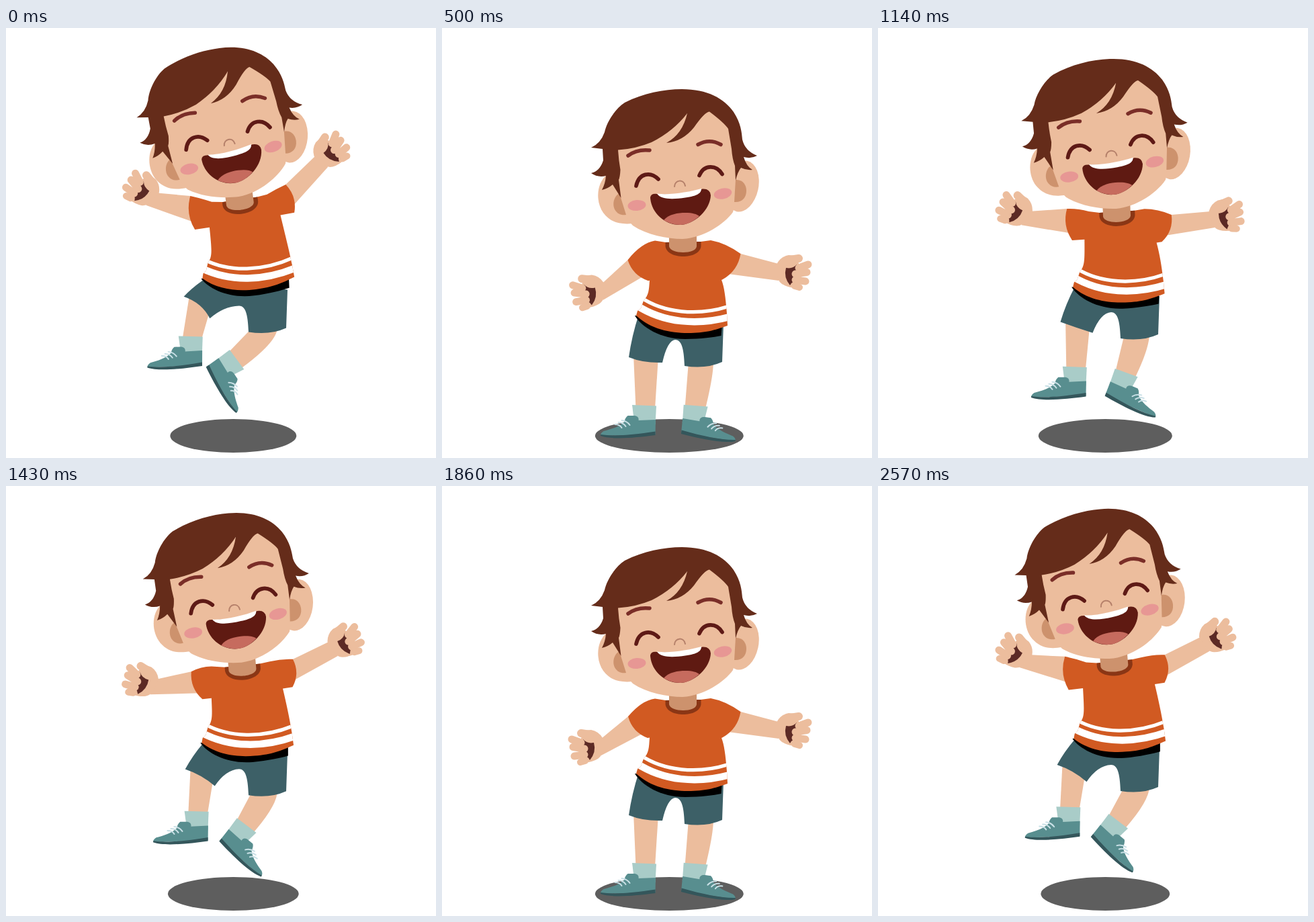
Animation of 640 by 640 pixels, one loop 2640 ms. Source, as an HTML page:

```html
<!DOCTYPE html>
<html lang="en">
<head>
<meta charset="utf-8">
<title>Jumping boy</title>
<style>
  html, body { margin: 0; width: 100%; height: 100%; overflow: hidden; background: #fff; }
  svg { display: block; width: 100%; height: 100%; }
  .skin { fill: #ecbd9d; }
  .shade { fill: #cd926d; }
  .hair { fill: #652c1a; }
  .shirt { fill: #d15a22; }
  .shorts { fill: #3d6067; }
  .blush { fill: #e79794; }
  .line { fill: none; stroke-linecap: round; stroke-linejoin: round; }
  .finger { stroke: #ecbd9d; }
  .brow { stroke: #7a2e28; stroke-width: 5.5; }
  .eye { stroke: #5e1a16; stroke-width: 5.7; }
</style>
</head>
<body>
<svg viewBox="0 0 640 640">
  <defs>
    <g id="hand">
      <path class="skin" d="M-17-17Q-11-27 0-29L12-28L17-8V14L11 20Q-2 19-10 14Q-19 8-17-8Z"/>
      <path class="line finger" stroke-width="12" d="M2-22L15-24"/>
      <path fill="#5c2a25" d="M12-15Q6-8-4-10Q-8 4 2 16Q4 12 8 10L13 0Z"/>
      <path class="line finger" stroke-width="11" d="M15-10L29-15M10-1L27-3.500M10 8L25 10"/>
      <path class="line finger" stroke-width="10" d="M9 17L16 19"/>
    </g>
    <g id="foot">
      <path fill="#a9ccc8" d="M-34.500-44L1.500-42.500L0-15H-31Z"/>
      <path fill="#588e8f" d="M.5-22L-25-21C-24-26-28-28-32-28H-41Q-45-25-46-19C-54-11-66-8-77-5Q-82-2-81.500 2L0 0Z"/>
      <path fill="#34565b" d="M-81.500 0C-62 3-35 1 0-4.500V1C-30 5-66 8-81.500 2Z"/>
      <path class="line" stroke="#c9e0e6" stroke-width="2" d="M-60-15q7 0 10 5M-55-18q7 0 11 6M-50-21q8 1 12 7"/>
    </g>
    <clipPath id="torso"><path id="clip"/></clipPath>
  </defs>

  <ellipse id="shadow" cx="338.300" cy="607" ry="25" fill="#5e5e5e"/>
  <path id="shinL" class="skin"/>
  <path id="shinR" class="skin"/>
  <use id="footL" href="#foot"/>
  <use id="footR" href="#foot"/>
  <path id="shorts" class="shorts"/>
  <path id="armL" class="skin"/>
  <path id="armR" class="skin"/>
  <use id="handL" href="#hand"/>
  <use id="handR" href="#hand"/>

  <g id="body">
    <path d="M287 428C297 445 325 463 362 463C385 463 405 460 415.500 458L417 440Z"/>
    <path id="shirt" class="shirt"/>
    <g clip-path="url(#torso)" fill="none" stroke="#fff">
      <path stroke-width="5.200" d="M296 401C330 424 380 429 426 414.500"/>
      <path stroke-width="10.500" d="M290 413C330 439 380 443 428 430"/>
    </g>
    <path fill="#8a3615" d="M332.500 319V325C335 345 383 345 385.500 325V318Z"/>
    <path class="shade" d="M338 300V325C340 337 378 337 379 325V300Z"/>

    <path class="skin" d="M246 218C230 230 228 258 240 275C250 288 262 293 284 291L280 220Z"/>
    <ellipse class="skin" cx="446.500" cy="235.500" rx="24.500" ry="38.500" transform="rotate(12 446.500 235.500)"/>
    <path class="skin" d="M258 172L267 250C271 275 276 286 284 294C305 308 335 314 358 314C390 312 420 292 433 274C440 250 440 200 428 150L398 118L330 138Z"/>
    <path class="shade" d="M264 246C256 250 253 262 257 270C261 277 267 279 274 278Z"/>
    <path class="shade" d="M437 226C448 225 453 234 453 242C453 254 445 260 435 259Z"/>
    <path class="hair" d="M222 178Q236 172 242 155C245 140 258 120 272 111C300 97 330 91 357 91C395 91 420 105 434 125C445 142 446 155 447 166Q451 183 469 190Q460 195 449 192Q453 206 462 211Q453 212 445 208Q440 214 437 227L436 205Q432 195 431 180L426 150Q420 141 398 124.500Q391 125 375 148Q358 169 334 171Q358 158 365 127Q344 154 312 170Q288 180 262 181.500Q263 197 265.500 211Q265 222 263 226L266.500 253L254 233Q247 239 238 241Q243 232 244 220Q232 223 222 216Q235 213 240 197L239 180Z"/>

    <path class="line brow" d="M277 190Q290 180 309 182M381 173.500Q398 164 415 173.500"/>
    <path class="line eye" d="M289 235C293 216 310 213 322 225M383 219.500C390 203 408 203 417 217.500"/>
    <path class="line" stroke="#b5806a" stroke-width="2" d="M346 236C346 226 360 224 362 235"/>
    <ellipse class="blush" cx="290" cy="264" rx="13.500" ry="8" transform="rotate(-5 290 264)"/>
    <ellipse class="blush" cx="418" cy="246.500" rx="13.500" ry="8" transform="rotate(-12 418 246.500)"/>
    <path fill="#5f1a12" d="M310 252Q311 246 320 247C345 250 368 244 388 239.500Q399 239 400 249C399 272 375 292 355 293C332 294 311 275 310 252Z"/>
    <path fill="#c66b5e" d="M330 286C337 277 352 275 362 275C373 275 379 277 383 280C372 290 362 293 355 293C345 293 337 290 330 286Z"/>
    <path fill="#fff" d="M320 246.500C340 249 368 244 386 239C386 246 380 250 362 252.500C345 255 326 256 320 246.500Z"/>
  </g>
</svg>

<script>
const LOOP = 2640, JUMP = LOOP / 2, STEP = LOOP / 37;
const LAND = 420, BEND = 535, PUSH = 870; // moments within one jump
const HEIGHT = 50.5, LEAN = 7.2;

const $ = Object.fromEntries([...document.querySelectorAll('svg [id]')].map(e => [e.id, e]));
const draw = (id, ...parts) => $[id].setAttribute('d', parts.flat().join(' '));
const place = (id, [x, y, turn], after = '') =>
  $[id].setAttribute('transform', `translate(${x} ${y}) rotate(${turn}) ${after}`);
const mix = (a, b, k) => a.map((v, i) => v + (b[i] - v) * k);

// Moves a local point into a frame given as x, y, turn.
function attach([px, py], [x, y, turn]) {
  const a = turn * Math.PI / 180, c = Math.cos(a), s = Math.sin(a);
  return [x + px * c - py * s, y + px * s + py * c];
}

// rise: height of the jump; tuck: bent legs and lean; wave: left arm, which overswings.
function motion(t) {
  let rise = 0, tuck = 0, crouch = 0;
  if (t < LAND) {
    rise = (1 + Math.cos(Math.PI * t / LAND)) / 2;
    tuck = (1 - t / LAND) ** 1.4;
  } else if (t > PUSH) {
    const s = (t - PUSH) / (JUMP - PUSH);
    rise = Math.sin(Math.PI / 2 * s);
    tuck = s ** 2.3;
  } else if (t > BEND) {
    crouch = 7 * Math.sin(Math.PI * (t - BEND) / (PUSH - BEND));
  }
  const wave = t < BEND ? Math.cos(Math.PI * t / 420) * (1 - t / BEND) : rise;
  return { lift: HEIGHT * rise, drop: crouch - HEIGHT * rise, rise, tuck, wave };
}

// Control point of a cuff, pushed outward.
function bulge([a, b], side) {
  const dx = b[0] - a[0], dy = b[1] - a[1], k = 11 * side / Math.hypot(dx, dy);
  return [(a[0] + b[0]) / 2 + dy * k, (a[1] + b[1]) / 2 - dx * k];
}

function drawArm(name, side, onBody, [a, b], { shoulder, reach, shrug, turn, raise }) {
  const [sx, sy] = onBody(shoulder);
  const palm = attach(reach, [sx + shrug[0] * raise, sy + shrug[1] * raise, turn * raise]);
  const hand = [...palm, turn * raise];
  const mid = mix(a, b, .5);
  draw('arm' + name, 'M', onBody(a), 'L', attach([-15 * side, -16], hand), attach([-15 * side, 9], hand),
    onBody(mix(a, b, .78)), onBody([mid[0] - 12 * side, mid[1]]), 'Z');
  place('hand' + name, hand, `scale(${side} 1)`);
}

function drawShirt(left, right) {
  const [al, bl] = left, [ar, br] = right;
  const path = ['M 333 319 L 317 316.500 Q', (317 + al[0]) / 2, (317 + al[1]) / 2 - (al[1] - 300) / 4, al,
    'Q', bulge(left, -1), bl, 'L', 309, bl[1] - .5,
    'C 308 390 308 397 300 406 L 296 417 L 291 421 L 289 428',
    'C 310 448 340 454 366 454 S 405 450 425 443 L 424 425 C 422 400 420 385', 416, br[1] + 1,
    'L', br, 'Q', bulge(right, 1), ar,
    'Q', (400 + ar[0]) / 2, (316 + ar[1]) / 2 - (ar[1] - 300) / 6, 400, 316, 'L 385 318 Z'];
  draw('shirt', path);
  draw('clip', path);
}

function drawLegs({ lift, drop, tuck }) {
  const footL = [317.5 - 25.5 * tuck, 605 - lift - 52.5 * tuck, -tuck];
  const footR = [356 - 57.5 * tuck, 603 - lift - 48.5 * tuck, 7 + 49 * tuck];
  const thigh = (x, y) => attach([x - 343, y - 446], [343, 446 + drop, 31 * tuck]);
  const hip = (x, y) => [x, y + drop];
  const knee = 1.2 * Math.max(0, drop);
  const outer = thigh(278, 490), inner = thigh(328, 498), waist = hip(293, 426);
  const seam = mix(waist, outer, .5);
  draw('shorts', 'M', waist, 'Q', seam[0] - 3, seam[1], outer,
    'Q', thigh(300 + 6 * tuck, 499 - 15 * tuck), inner,
    'Q', (inner[0] + 347) / 2 - 2, 465 + drop, hip(347, 464),
    'C', hip(356, 464), hip(360, 475), hip(361, 503), 'Q', hip(393, 508), hip(417, 497),
    'L', hip(419, 440), 'Z');
  draw('shinL', 'M', thigh(285 - knee, 486), 'L', attach([-29, -38], footL),
    attach([-.5, -38], footL), thigh(322 - knee, 488), 'Z');
  draw('shinR', 'M', hip(367 + knee * .7, 496), 'L', attach([1, -37], footR), attach([31, -38], footR),
    'Q', hip(404 + knee, 518), hip(404 + knee, 496), 'Z');
  place('footL', footL);
  place('footR', footR, 'scale(-1 1)');
}

function render(time) {
  const t = Math.floor((time % LOOP + 4) / STEP) % 37 * STEP % JUMP;
  const pose = motion(t), { drop, rise, tuck, wave } = pose;
  const body = [253, 399 + drop, -LEAN * tuck];
  const onBody = ([x, y]) => attach([x - 253, y - 399], body);
  // Cuff ends: arms down, then arms up.
  const left = [mix([277, 343], [286.5, 304], wave), mix([306, 375], [287, 354.5], wave)];
  const right = [mix([444.5, 336], [429.5, 305], tuck), mix([418, 374], [437, 348], tuck)];

  $.shadow.setAttribute('rx', 110.5 - 16.5 * (.3 * tuck + .7 * rise));
  drawLegs(pose);
  drawArm('L', -1, onBody, left,
    { shoulder: [310, 352], reach: [-88, 40], shrug: [-8.5, -17], turn: 43, raise: wave });
  drawArm('R', 1, onBody, right,
    { shoulder: [412, 352], reach: [104, 15], shrug: [-3, -25], turn: -48, raise: tuck });
  drawShirt(left, right);
  place('body', body, 'translate(-253 -399)');
}

const start = performance.now();
function tick() {
  render(performance.now() - start);
  requestAnimationFrame(tick);
}
tick();
</script>
</body>
</html>
```
